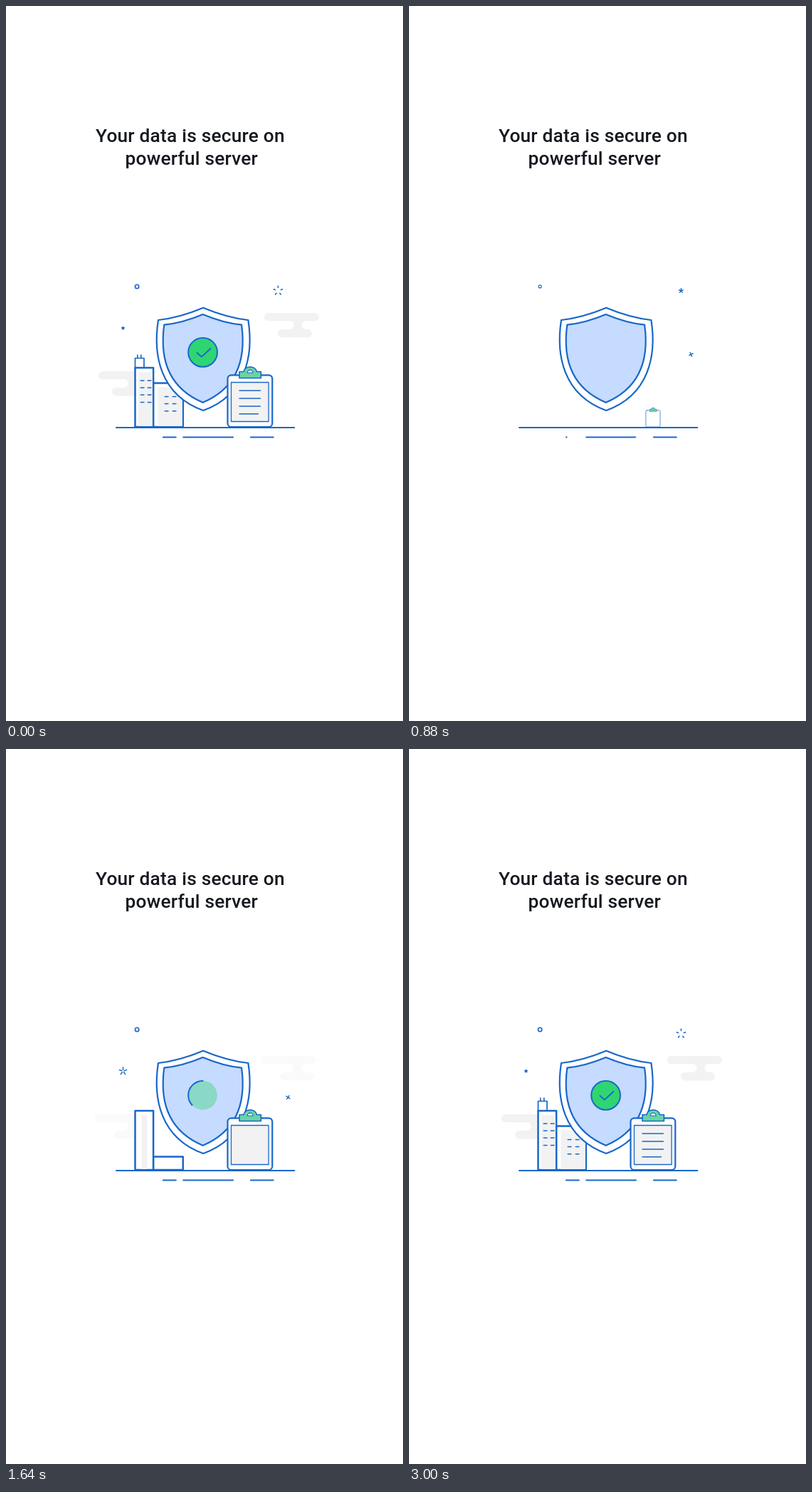
Animation, 558 px wide and 1004 px high, one loop 3040 ms. Source, as an HTML page with a canvas:

```html
<!DOCTYPE html>
<html lang="en">
<head>
<meta charset="utf-8">
<title>Secure data</title>
<style>
  html, body { margin: 0; width: 100%; height: 100%; overflow: hidden; background: #fff; }
  canvas { position: absolute; left: 0; top: 0; width: 558px; height: 1004px; }
  h1 { margin: 0; font: 500 26.3px/32px Roboto, sans-serif; letter-spacing: 0.2px; color: #14181f; }
  h1 span { position: absolute; white-space: nowrap; }
  .first { left: 126px; top: 166px; }
  .second { left: 167.5px; top: 198px; }
</style>
</head>
<body>
<canvas id="stage"></canvas>
<h1><span class="first">Your data is secure on</span> <span class="second">powerful server</span></h1>
<script>
const LOOP = 3040, STEP = 40, GROUND = 591;
const BLUE = '#1967c9', GRAY = '#f2f2f2', PALE = '#c5dbff', GREEN = '#2fd572', MINT = '#6ad3a5';

const canvas = document.getElementById('stage');
const ctx = canvas.getContext('2d');
const ratio = window.devicePixelRatio || 1;
canvas.width = 558 * ratio;
canvas.height = 1004 * ratio;

const clamp = v => Math.max(0, Math.min(1, v));
const span = (t, from, to) => clamp((t - from) / (to - from));
const ease = p => p < 0.5 ? 2 * p * p : 1 - 2 * (1 - p) ** 2;
const eased = (t, from, to) => ease(span(t, from, to));
const mix = (a, b, p) => a + (b - a) * p;

function stroke(width) {
  ctx.strokeStyle = BLUE;
  ctx.lineWidth = width;
  ctx.stroke();
}

function line(x1, y1, x2, y2, width) {
  ctx.beginPath();
  ctx.moveTo(x1, y1);
  ctx.lineTo(x2, y2);
  stroke(width);
}

// Horizontal stroke that grows from its left end.
function dash(x1, x2, y, p, width) {
  if (p > 0) line(x1, y, mix(x1, x2, p), y, width);
}

function box(x, y, w, h, fill, width) {
  ctx.beginPath();
  ctx.rect(x, y, w, h);
  ctx.fillStyle = fill;
  ctx.fill();
  if (width) stroke(width);
}

function scaledAt(x, y, scale, draw) {
  if (scale <= 0) return;
  ctx.save();
  ctx.translate(x, y);
  ctx.scale(scale, scale);
  ctx.translate(-x, -y);
  draw();
  ctx.restore();
}

function cloud(dx, dy, t) {
  const alpha = span(t, 1460, 1920);
  if (!alpha) return;
  const left = LOOP - t;
  const top = 363 + dx - left * 0.0036;
  const low = 382 + dx + left * 0.0022;
  const mid = 410 + dx;
  const shade = Math.round(255 - 13 * alpha);
  ctx.fillStyle = `rgb(${shade}, ${shade}, ${shade})`;
  ctx.beginPath();
  ctx.roundRect(top, 431 + dy, 77, 11.3, 5.6);
  ctx.roundRect(low, 454 + dy, 48, 11.5, 5.7);
  ctx.fill();
  ctx.beginPath();
  ctx.moveTo(mid - 12, 441.5 + dy);
  ctx.arc(mid - 12, 448 + dy, 6.5, -Math.PI / 2, Math.PI / 2);
  ctx.lineTo(mid + 12, 454.5 + dy);
  ctx.arc(mid + 12, 448 + dy, 6.5, Math.PI / 2, Math.PI * 1.5);
  ctx.fill();
}

function building(x, w, h, p) {
  if (p > 0) box(x, GROUND - h * p, w, h * p, '#fff', 2.5);
}

// Two columns of windows lit one after another.
function windows(t, columns, rows, start, gap) {
  rows.forEach((y, r) => columns.forEach((x, c) => {
    const at = start + (r * 2 + c) * gap;
    dash(x, x + 4.6, y, span(t, at, at + 60), 1.6);
  }));
}

function tower(t) {
  const roof = eased(t, 1900, 2140);
  if (roof > 0) {
    const y = 508 - 13.5 * roof;
    const tip = 4.5 * eased(t, 2100, 2280);
    box(181.5, y, 12.5, 508 - y, '#fff', 1.7);
    if (tip > 0) [184.8, 189.8].forEach(x => line(x, y, x, y - tip, 1.6));
  }
  building(181.5, 25.6, 83, eased(t, 1004, 1300));
  const shade = span(t, 1560, 1760);
  if (shade > 0) {
    const a = mix(193, 186, shade), b = mix(193, 206, shade);
    box(a, 514, b - a, 76, GRAY);
  }
  windows(t, [189.3, 199.3], [526, 536, 546, 556.5], 1730, 70);
}

function annex(t) {
  building(207.2, 41.6, 61.5, eased(t, 1524, 1824));
  const shade = span(t, 1840, 2060);
  if (shade > 0) box(mix(231, 213.5, shade), 535.5, 34.3 * shade, 54.5, GRAY);
  windows(t, [223.3, 234.3], [548.5, 558.5, 568.7], 2290, 100);
}

function shieldPath(x, top, shoulder, base, half, dip, c1, c2) {
  ctx.beginPath();
  ctx.moveTo(x, top);
  ctx.quadraticCurveTo(x + half * 0.52, dip, x + half, shoulder);
  ctx.bezierCurveTo(x + c1, 490, x + c2, base - 22, x, base);
  ctx.bezierCurveTo(x - c2, base - 22, x - c1, 490, x - half, shoulder);
  ctx.quadraticCurveTo(x - half * 0.52, dip, x, top);
  ctx.closePath();
}

function shield(t) {
  const scale = t < 640 ? 1.187 * eased(t, 334, 640) : mix(1.187, 1, eased(t, 640, 880));
  scaledAt(280, 493, scale, () => {
    shieldPath(277.2, 423.7, 441, 568, 63.2, 437.5, 70.8, 60.8);
    ctx.fillStyle = '#fff';
    ctx.fill();
    stroke(2.2);
    shieldPath(276.7, 433, 447.7, 556.8, 54.4, 445, 60.2, 52);
    ctx.fillStyle = PALE;
    ctx.fill();
    stroke(2.2);
  });
}

function badge(t) {
  const fade = span(t, 1520, 1820);
  if (fade > 0) {
    ctx.globalAlpha = fade;
    ctx.beginPath();
    ctx.arc(276.6, 486.3, 20.3, 0, Math.PI * 2);
    ctx.fillStyle = GREEN;
    ctx.fill();
    ctx.globalAlpha = 1;
  }
  const ring = eased(t, 1460, 1880);
  if (ring > 0) {
    ctx.beginPath();
    ctx.arc(276.6, 486.3, 20.4, -Math.PI / 2, -Math.PI / 2 - Math.PI * 2 * ring, true);
    stroke(2);
  }
  const tick = eased(t, 1880, 2160);
  if (tick > 0) {
    const a = clamp(tick / 0.33), b = clamp((tick - 0.33) / 0.67);
    ctx.beginPath();
    ctx.moveTo(268.5, 487);
    ctx.lineTo(mix(268.5, 274.8, a), mix(487, 492.6, a));
    if (b > 0) ctx.lineTo(mix(274.8, 287.5, b), mix(492.6, 481, b));
    stroke(1.9);
  }
}

function clip() {
  ctx.beginPath();
  ctx.moveTo(328, 522.5);
  ctx.lineTo(328, 513.5);
  ctx.lineTo(334, 513.5);
  ctx.bezierCurveTo(336, 504.4, 350.5, 504.4, 352.5, 513.5);
  ctx.lineTo(358.4, 513.5);
  ctx.lineTo(358.4, 522.5);
  ctx.closePath();
  ctx.fillStyle = MINT;
  ctx.fill();
  stroke(1.6);
  ctx.beginPath();
  ctx.arc(343.2, 515, 3.9, Math.PI, 0);
  ctx.closePath();
  ctx.fillStyle = '#fff';
  ctx.fill();
  stroke(1.2);
}

function clipboard(t) {
  scaledAt(343, GROUND, eased(t, 760, 1060), () => {
    ctx.beginPath();
    ctx.roundRect(311.5, 518.4, 62.8, 72.6, 5);
    ctx.fillStyle = '#fff';
    ctx.fill();
    stroke(2.2);
    const sheet = eased(t, 1260, 1600);
    if (sheet > 0) box(316.5, 528.5, 52.6 * sheet, 55, GRAY, 1.3);
    clip();
  });
  [540, 551, 562, 572.7].forEach((y, i) => {
    const at = 1720 + i * 130;
    dash(328, i < 3 ? 357.5 : 354.5, y, eased(t, at, at + 180), 1.4);
  });
}

// Five rays that start as a small star, spread and shrink away.
function burst(x, y, age) {
  const inner = Math.max(0, (age - 165) * 0.0106);
  const outer = mix(1.6, 6.5, span(age, 0, 440));
  if (age <= 0 || inner >= outer) return;
  for (let i = 0; i < 5; i++) {
    const a = -Math.PI / 2 + i * Math.PI * 0.4;
    const c = Math.cos(a), s = Math.sin(a);
    line(x + c * inner, y + s * inner, x + c * outer, y + s * outer, 1.5);
  }
}

function cross(t) {
  const size = 3 * eased(t, 200, 520) * (1 - eased(t, 2740, 2980));
  if (size <= 0) return;
  const turn = Math.PI / 4 + Math.max(0, t - 640) * 0.08 * Math.PI / 180;
  for (const a of [turn, turn + Math.PI / 2]) {
    const dx = Math.cos(a) * size, dy = Math.sin(a) * size;
    line(396.4 - dx, 489.2 - dy, 396.4 + dx, 489.2 + dy, 1.4);
  }
}

function ringlet(t) {
  const dip = eased(t, 360, 1160) * (1 - eased(t, 1200, 1620));
  ctx.beginPath();
  ctx.arc(184.1, 393.9, 2.7 * (1 - 0.38 * dip), 0, Math.PI * 2);
  stroke(1.6 - 0.5 * dip);
}

function draw(t) {
  ctx.setTransform(ratio, 0, 0, ratio, 0, 0);
  ctx.clearRect(0, 0, 558, 1004);
  ctx.lineCap = 'round';
  ctx.lineJoin = 'round';

  cloud(0, 0, t);
  cloud(-233, 82, t);
  tower(t);
  annex(t);
  shield(t);
  badge(t);
  clipboard(t);

  dash(155, 405.3, 592, eased(t, 40, 624), 2.2);
  dash(344, 375.7, 605.5, eased(t, 480, 700), 2.2);
  dash(249.3, 319, 605.5, eased(t, 650, 900), 2.2);
  dash(221, 238.7, 605.5, eased(t, 860, 1040), 2.2);

  ringlet(t);
  cross(t);
  for (const start of [760, 2440]) burst(382.4, 399.8, t - start);
  for (const start of [1300, 2980]) burst(164.5, 452.3, t - start);
}

// The loop opens on the finished picture, then restarts from nothing.
function tick(now) {
  const step = Math.floor((now % LOOP) / STEP) * STEP;
  draw(step === 0 ? LOOP - STEP : step);
  requestAnimationFrame(tick);
}
draw(LOOP - STEP);
requestAnimationFrame(tick);
</script>
</body>
</html>
```
